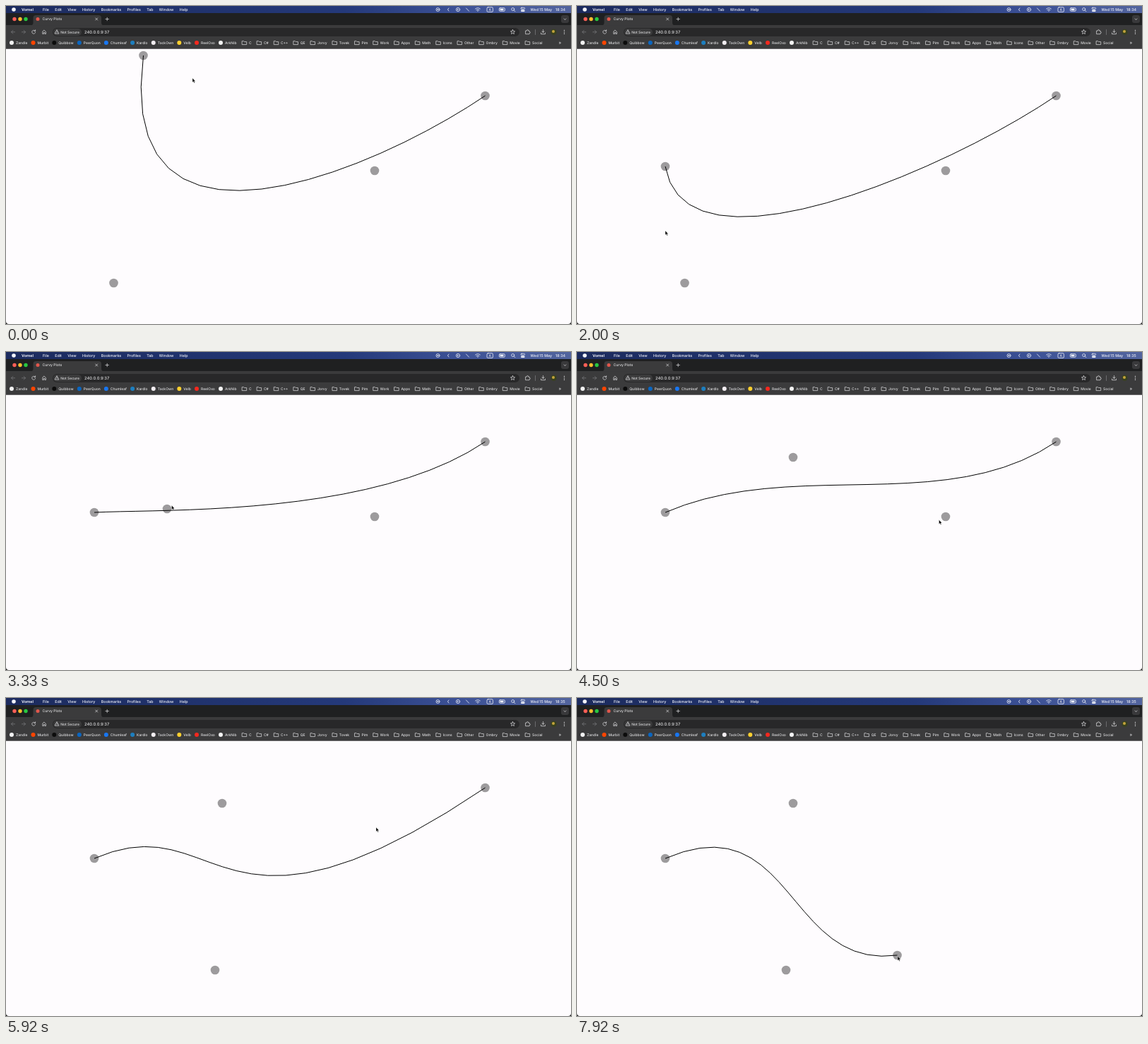
An HTML page that plays this animation: 800x450 px, repeating every 8 s.

```html
<!DOCTYPE html>
<html lang="en">
<head>
<meta charset="utf-8">
<title>Curve editor</title>
<style>
  html, body { margin: 0; width: 100%; height: 100%; overflow: hidden; background: #fefcfe; }
  svg { display: block; width: 100vw; height: 100vh; }
  text { font: 500 5px Inter, "Open Sans", sans-serif; fill: #e0e0e2; white-space: pre; text-rendering: geometricPrecision; }
  .menu text { font-size: 5.3px; fill: #f4f5fa; }
  .menu .app { font-weight: 700; }
  .icon { fill: none; stroke: #d0d0d2; stroke-width: .8; stroke-linecap: round; stroke-linejoin: round; }
  .dim { stroke: #77787a; }
  .light { stroke: #eef0f8; }
  .solid { fill: #eef0f8; stroke: none; }
</style>
</head>
<body>
<svg viewBox="0 0 800 450" preserveAspectRatio="none">
  <defs>
    <linearGradient id="sky">
      <stop offset="0" stop-color="#1c2b5e"/>
      <stop offset=".6" stop-color="#24397a"/>
      <stop offset=".8" stop-color="#3c5196"/>
      <stop offset="1" stop-color="#52649e"/>
    </linearGradient>
  </defs>

  <rect width="800" height="450" fill="#fefcfe"/>
  <path d="M0 446v4h4q-4 0-4-4zM800 446v4h-4q4 0 4-4z" fill="#111"/>
  <g id="dots" fill="#9d9b9d"></g>
  <polyline id="curve" fill="none" stroke="#000"/>

  <!-- Bars -->
  <rect width="800" height="11" fill="url(#sky)"/>
  <rect y="10" width="800" height="18" fill="#1f2021"/>
  <rect y="27" width="800" height="33.5" fill="#3b3b3c"/>
  <rect y="60" width="800" height=".7" fill="#555556"/>

  <!-- Menu bar -->
  <g class="menu" id="menu">
    <circle cx="11" cy="5" r="2.8" fill="#f4f5fa"/>
    <text class="app" x="22" y="7">Vornel</text>
    <text x="742.5" y="7">Wed 15 May</text>
    <text id="clock" x="778" y="7"></text>
  </g>
  <g class="icon light">
    <circle cx="611.5" cy="5" r="2.5"/>
    <circle class="solid" cx="611.5" cy="5" r="1"/>
    <path d="M627 3l-1.600 2 1.600 2"/>
    <circle cx="640" cy="5" r="2.6"/>
    <path class="solid" d="M639 3.800v2.400l2-1.200z"/>
    <path d="M651.500 3l4 4.200"/>
    <path d="M664.600 4q3.400-2.800 6.800 0M666 5.600q2-1.700 4 0M667.500 7h1"/>
    <rect x="681" y="1.800" width="8.400" height="6.600" rx="1.400"/>
    <rect x="698.300" y="2.700" width="8" height="4.600" rx="1.200"/>
    <rect class="solid" x="699.500" y="3.700" width="5" height="2.600"/>
    <circle cx="717.700" cy="4.500" r="2"/><path d="M719.200 6l1.700 1.700"/>
    <rect x="729" y="2.300" width="5.600" height="2.200" rx="1.100"/>
    <rect class="solid" x="729" y="5.500" width="5.600" height="2.600" rx="1.300"/>
  </g>
  <text x="683.4" y="6.9">A</text>

  <!-- Tabs -->
  <g id="lights"></g>
  <path d="M34.500 27.500q4 0 4-4V17q0-4 4-4H131q4 0 4 4v6.500q0 4 4 4z" fill="#3b3b3c"/>
  <circle cx="45" cy="18.5" r="2.5" fill="#e2574c"/>
  <text x="51.5" y="20.4">Curvy Plots</text>
  <rect x="786" y="13" width="11" height="11" rx="3" fill="#39393b"/>

  <!-- Toolbar -->
  <rect x="66" y="31" width="661" height="12" rx="6" fill="#282829"/>
  <rect x="67" y="32" width="40" height="10" rx="5" fill="#3b3b3c"/>
  <text x="77.2" y="38.6">Not Secure</text>
  <text x="111" y="38.8" style="font-size:5.8px">240.0.0.9:37</text>
  <g class="icon">
    <path d="M126.700 17l3 3m0-3l-3 3M141 18.500h4.400m-2.200-2.200v4.400M790 18l1.500 1.500 1.500-1.500"/>
    <path class="dim" d="M12.500 36.800h-5m2.300-2.300l-2.300 2.300 2.300 2.300M22.500 36.800h5m-2.300-2.300l2.300 2.300-2.300 2.300M749.500 33.500v7"/>
    <path d="M41.300 35.300a2.500 2.500 0 1 0 .4 2M41.600 33.800v1.800h-1.800"/>
    <path d="M51.800 36.500v3h1.500v-2h1.600v2h1.500v-3l-2.300-2.200z"/>
    <path d="M72.200 34l2.800 5h-5.600zm0 2v1.200"/>
    <path d="M717.500 33.600l.9 2 2.200.2-1.700 1.500.5 2.200-1.900-1.200-1.900 1.200.5-2.200-1.700-1.500 2.200-.2z"/>
    <path d="M736 35h1.500q0-1.500 1-1.500t1 1.500h1.500v1.500q1.300 0 1.300 1t-1.300 1v1.200h-5z"/>
    <path d="M760.500 33.600v3.700m-1.700-1.500l1.700 1.700 1.700-1.700M757.500 38v1.700h6V38"/>
  </g>
  <circle cx="775.5" cy="36.8" r="4" fill="#39411f"/>
  <circle cx="775" cy="36" r="2" fill="#c4a43c"/>
  <path d="M790.500 34.500v5" stroke="#d8d8da" stroke-width="1.4" stroke-linecap="round" stroke-dasharray="0 2.400"/>

  <g id="bookmarks"><text x="782.5" y="54" style="font-size:6px">»</text></g>

  <path id="pointer" d="M0 0v6l1.400-1.200 1 2.300 1-.5-1-2.200h1.800z" fill="#000" stroke="#fff" stroke-width=".35"/>
</svg>
<script>
const $ = id => document.getElementById(id);

function add(parent, tag, attrs, content = '') {
  const el = document.createElementNS('http://www.w3.org/2000/svg', tag);
  for (const name in attrs) el.setAttribute(name, attrs[name]);
  el.textContent = content;
  return parent.appendChild(el);
}

// Spreads labels between two edges with equal gaps; drawIcon gets each label's left edge.
function row(parent, names, left, right, y, iconWidth = 0, drawIcon = () => {}) {
  const labels = names.map(name => add(parent, 'text', { y }, name));
  const widths = labels.map(label => label.getComputedTextLength() + iconWidth);
  const gap = (right - left - widths.reduce((a, b) => a + b)) / (names.length - 1);
  let x = left;
  labels.forEach((label, i) => {
    drawIcon(x, i);
    label.setAttribute('x', x + iconWidth);
    x += widths[i] + gap;
  });
}

['#fe5f57', '#febc2e', '#28c840'].forEach((fill, i) =>
  add($('lights'), 'circle', { cx: 12 + 8 * i, cy: 18.5, r: 2.7, fill }));

row($('menu'), 'File Edit View History Bookmarks Profiles Tab Window Help'.split(' '), 52, 257.5, 7);

const sites = {
  Zandle: '#f2f2f2', Murbit: '#ff4500', Quibbow: '#0c0c0c', PeerQuon: '#0a66c2',
  Chumleaf: '#1877f2', Kardlo: '#1d7fc0', TackOwn: '#f3eef2', Velb: '#ffd02f',
  ReelOxo: '#f5281e', ArkNib: '#f4f4f4'
};
const bar = $('bookmarks');
row(bar, Object.keys(sites), 5, 326.5, 53.9, 9, (x, i) =>
  add(bar, 'circle', { cx: x + 3, cy: 52, r: 3, fill: Object.values(sites)[i] }));

const folders = 'C,C#,C++,QE,Jorvy,Tovek,Pim,Work,Apps,Math,Icons,Other,Ombry,Movie,Social';
row(bar, folders.split(','), 334.5, 759.5, 53.9, 9.5, x =>
  add(bar, 'path', { class: 'icon', d: `M${x} 49.700h2.200l.8.900h3.200v4h-6.200z` }));

const ease = {
  in: u => u * u,
  out: u => u * (2 - u),
  both: u => u ** 3 * (u * (6 * u - 15) + 10)
};

// The pointer's trip in steps of a twelfth of a second; a trip with a handle drags it along.
const trips = [
  { from: 1, until: 7, to: [196, 71], pace: 'both' },
  { from: 10, until: 20, to: [126.5, 228], pace: 'both', handle: 0 },
  { from: 22, until: 24, to: [125, 318], pace: 'in' },
  { from: 24, until: 27, to: [159, 387], pace: 'out' },
  { from: 31, until: 40, to: [234.5, 217], pace: 'in', handle: 1 },
  { from: 40, until: 44, to: [312.5, 144], pace: 'out', handle: 1 },
  { from: 47, until: 54, to: [512.5, 237.5], pace: 'both' },
  { from: 54, until: 55, to: [523, 235], pace: 'out' },
  { from: 56, until: 67, to: [297, 387], pace: 'both', handle: 2 },
  { from: 68, until: 71, to: [524, 183], pace: 'in' },
  { from: 71, until: 75, to: [679, 128.5], pace: 'out' },
  { from: 78, until: 85, to: [575.5, 185.5], pace: 'both', handle: 3 },
  { from: 85, until: 95, to: [454, 365.5], pace: 'both', handle: 3 }
];

function pose(step) {
  const handles = [[194.5, 70], [152.5, 392], [522, 233], [678.5, 127]];
  let pointer = [264, 102];
  for (const { from, until, to, pace, handle } of trips) {
    if (step <= from) break;
    const part = ease[pace](Math.min(1, (step - from) / (until - from)));
    const shift = to.map((end, axis) => (end - pointer[axis]) * part);
    const move = point => point.map((value, axis) => value + shift[axis]);
    pointer = move(pointer);
    if (handle !== undefined) handles[handle] = move(handles[handle]);
  }
  return { handles, pointer };
}

function bezier(p, t) {
  const s = 1 - t;
  return [0, 1].map(axis =>
    s ** 3 * p[0][axis] + 3 * s * s * t * p[1][axis] +
    3 * s * t * t * p[2][axis] + t ** 3 * p[3][axis]);
}

const LOOP = 8000, STEPS = 96, SEGMENTS = 20;
const dots = pose(0).handles.map(() => add($('dots'), 'circle', { r: 6.3 }));

function draw(elapsed) {
  // A few ms of slack absorbs the rounding of step times.
  const step = Math.floor((elapsed + 4) % LOOP / LOOP * STEPS);
  const { handles, pointer } = pose(step);
  handles.forEach((point, i) => dots[i].setAttribute('transform', `translate(${point})`));
  $('curve').setAttribute('points',
    Array.from({ length: SEGMENTS + 1 }, (_, i) => bezier(handles, i / SEGMENTS)).join(' '));
  $('pointer').setAttribute('transform', `translate(${pointer})`);
  $('clock').textContent = step < STEPS / 2 ? '18:34' : '18:35';
}

let start;
function tick(now) {
  start ??= now;
  draw(now - start);
  requestAnimationFrame(tick);
}
draw(0);
requestAnimationFrame(tick);
</script>
</body>
</html>
```
